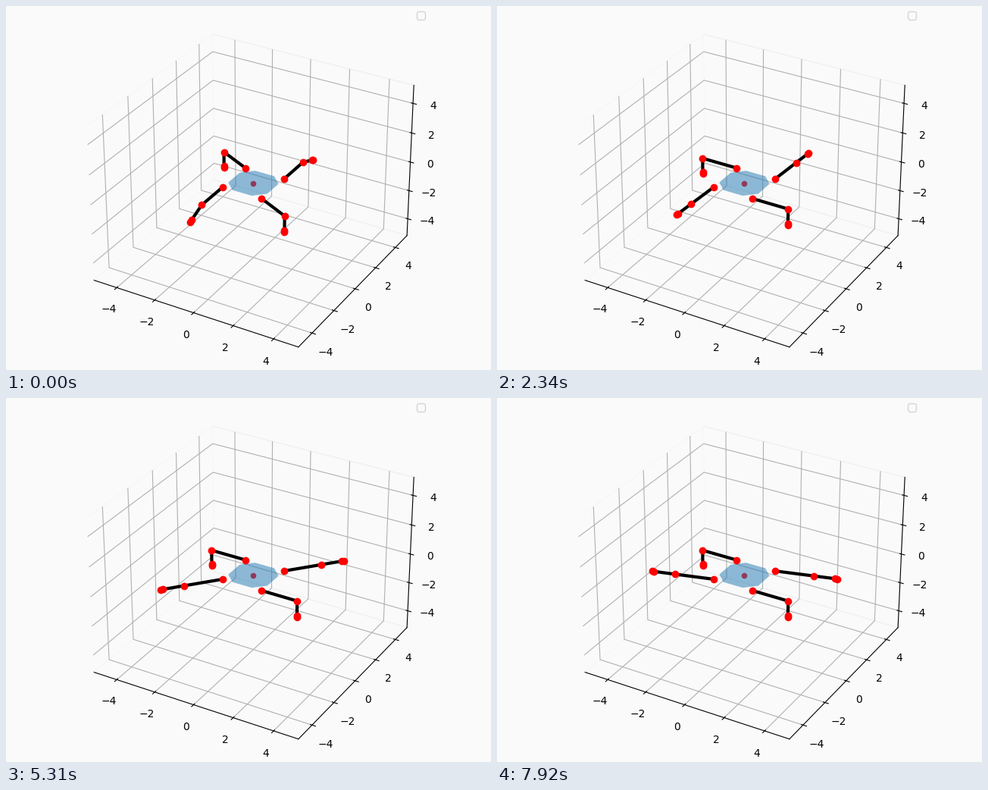
These frames come from a looping animation (640x480 px, 8 s). A matplotlib script:

```python
import numpy as np
import matplotlib.pyplot as plt
from matplotlib.animation import FuncAnimation
from mpl_toolkits.mplot3d.art3d import Poly3DCollection

FRAMES = 89
LOOP_MS = 8000
STEP = 0.02          # radians per frame
SWITCH = 23          # frame at which the second phase begins
FEMUR, TIBIA, TOE = 1.775, 0.975, 0.1
BG = "#fafafa"

# hip x, hip y, added yaw, True for the legs that sweep
LEGS = [(1, 1, 0, True), (-1, -1, np.pi, True),
        (1, -1, 0, False), (-1, 1, np.pi, False)]


def leg_points(hip_x, hip_y, yaw, pitch):
    """Hip, knee, ankle and toe of a leg, as three coordinate arrays."""
    lower = np.array([0, 0, TIBIA, TIBIA + TOE])
    reach = np.array([0, FEMUR, FEMUR, FEMUR]) + lower * np.cos(pitch)
    return (hip_x + reach * np.cos(yaw),
            hip_y + reach * np.sin(yaw),
            lower * np.sin(pitch))


def leg_pose(n, sweeps):
    """Yaw and tibia pitch at frame n."""
    settle = STEP * (min(n, SWITCH) - SWITCH)
    if sweeps:
        return np.pi / 2 - STEP * max(n - SWITCH, 0), settle
    return settle, -np.pi / 2


fig = plt.figure(figsize=(6.4, 4.8), dpi=100, facecolor=BG)
ax = fig.add_axes([0, 0, 1, 1], projection="3d", computed_zorder=False,
                  facecolor=BG)

body = [(1, -.5, 0), (1, .5, 0), (.5, 1, 0), (-.5, 1, 0),
        (-1, .5, 0), (-1, -.5, 0), (-.5, -1, 0), (.5, -1, 0)]
ax.scatter([0], [0], [0], c="red", zorder=1)
ax.add_collection3d(Poly3DCollection([body], facecolors="#1f77b4",
                                     alpha=0.5, zorder=2))
lines = [ax.plot([], [], [], "o-", color="black", lw=3, mfc="red", mec="red",
                 zorder=3)[0] for _ in LEGS]

lim = 5 * 25 / 24
ticks = range(-4, 5, 2)
ax.set(xlim=(-lim, lim), ylim=(-lim, lim), zlim=(-lim, lim),
       xticks=ticks, yticks=ticks, zticks=ticks)
for axis, edge in ((ax.xaxis, "#f7f7f7"), (ax.yaxis, "#f0f0f0"),
                   (ax.zaxis, "none")):
    axis.pane.set(facecolor="none", edgecolor=edge, alpha=1)
ax.legend(handles=[], loc="upper right", facecolor=BG)


def update(n):
    for line, (x, y, turn, sweeps) in zip(lines, LEGS):
        yaw, pitch = leg_pose(n, sweeps)
        line.set_data_3d(*leg_points(x, y, yaw + turn, pitch))
    return lines


anim = FuncAnimation(fig, update, frames=FRAMES, interval=LOOP_MS / FRAMES,
                     repeat=True, repeat_delay=0, blit=False)
plt.show()
```
